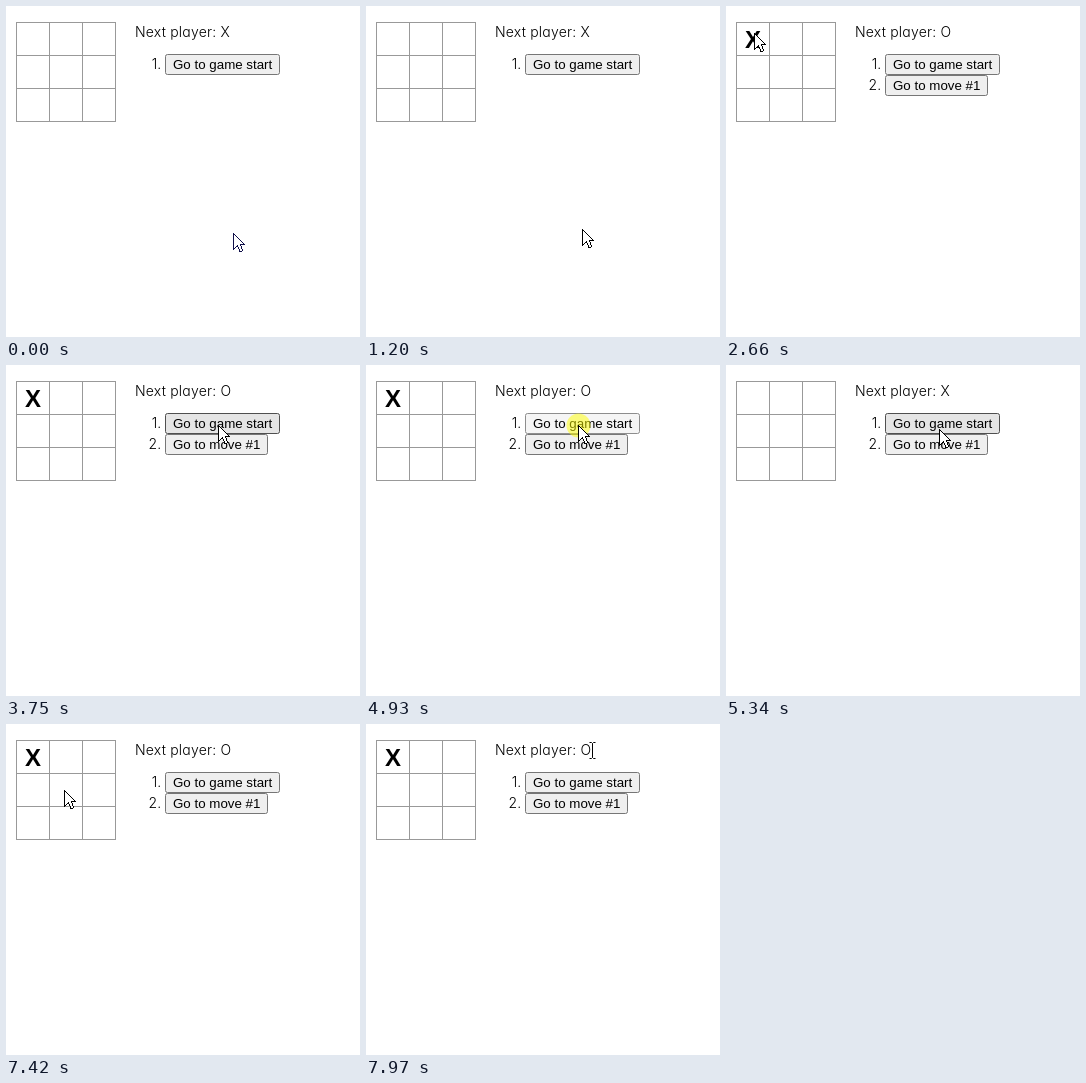
Recreate the animation shown at these times as an HTML page. Size 354 by 331 pixels, loop 8 s.

```html
<!DOCTYPE html>
<html lang="en">
<head>
<meta charset="utf-8">
<title>Tic-tac-toe</title>
<style>
  html, body { margin: 0; width: 100%; height: 100%; overflow: hidden; background: #fff; }
  svg { display: block; width: 354px; height: 331px; }
  text { white-space: pre; }
  .label { font: 300 14px Inter, "Open Sans", sans-serif; font-feature-settings: "cv11"; letter-spacing: .2px; }
  .end { text-anchor: end; }
  .button { font: 13.333px "Liberation Sans", Arial, sans-serif; }
  .mark { font: bold 24px "Liberation Sans", Arial, sans-serif; text-anchor: middle; }
  .crisp { shape-rendering: crispEdges; }
</style>
</head>
<body>
<svg viewBox="0 0 354 331">
  <g id="grid" class="crisp" fill="#999"></g>
  <text id="mark" class="mark" x="27" y="42">X</text>
  <text id="status" class="label" x="129" y="31"></text>
  <g id="moves"></g>
  <circle id="glow" r="12" fill="#ff0" fill-opacity=".5"/>
  <path id="arrow" class="crisp" d="M.5 .5V16.5L4.5 12.5L7 18.5H8.5L9.5 17L7.5 11.5H11.5Z" fill="#fff" stroke="#000"/>
  <path id="beam" d="M-3 -7.5H-1L0 -6.5L1 -7.5H3M0 -6.5V7.5M-3 8.5H-1L0 7.5L1 8.5H3" fill="none" stroke="#000"/>
</svg>
<script>
const LOOP = 8000;
const CELL = 33;
const $ = id => document.getElementById(id);
const show = (el, on) => el.setAttribute("visibility", on ? "visible" : "hidden");
const smooth = u => u * u * (3 - 2 * u);
const mix = (a, b, u) => a + (b - a) * u;

function add(parent, tag, attrs, text = "") {
  const el = document.createElementNS("http://www.w3.org/2000/svg", tag);
  for (const key in attrs) el.setAttribute(key, attrs[key]);
  el.textContent = text;
  parent.append(el);
  return el;
}

for (let i = 0; i < 4; i++) {
  add($("grid"), "rect", { x: 10 + i * CELL, y: 16, width: 1, height: 100 });
  add($("grid"), "rect", { x: 10, y: 16 + i * CELL, width: 100, height: 1 });
}

const buttons = ["Go to game start", "Go to move #1"].map((text, i) => {
  const top = 48 + i * 21;
  const group = add($("moves"), "g", {});
  add(group, "text", { class: "label end", x: 155.5, y: top + 15 }, `${i + 1}.`);
  const box = add(group, "rect", { x: 159.5, y: top + 0.5, height: 20, rx: 2 });
  const label = add(group, "text", { class: "button", x: 167, y: top + 15 }, text);
  const width = Math.floor(label.getComputedTextLength() + 16);
  box.setAttribute("width", width - 1);
  return { group, box, top, right: 159 + width };
});

// Each glide starts where the previous one stopped and advances in equal time steps.
const startAt = { x: 227, y: 227 };
const glides = [
  { from: 70, to: 70, steps: 1, x: 227, y: 226 },
  { from: 580, to: 730, steps: 3, x: 223, y: 225 },
  { from: 1200, to: 1200, steps: 1, x: 216, y: 223 },
  { from: 1277, to: 1660, steps: 6, x: 30, y: 22 },
  { from: 1810, to: 1960, steps: 3, x: 28, y: 27 },
  { from: 3140, to: 3750, steps: 9, x: 212, y: 60 },
  { from: 5340, to: 5340, steps: 1, x: 213, y: 64 },
  { from: 5415, to: 5790, steps: 6, x: 22, y: 31, bend: 32 },
  { from: 6968, to: 7500, steps: 8, x: 65, y: 73 },
  { from: 7670, to: 7970, steps: 5, x: 227, y: 26, bend: 12 },
];
const clicks = [2510, 4930, 6740];

function pointer(t) {
  let p = startAt;
  for (const g of glides) {
    if (t < g.from) break;
    const gap = (g.to - g.from) / (g.steps - 1) || 1;
    const step = Math.min(g.steps, 1 + Math.floor((t - g.from) / gap + 1e-6));
    const u = smooth(step / g.steps);
    const sag = 4 * u * (1 - u) * (g.bend || 0);
    p = { x: Math.round(mix(p.x, g.x, u)), y: Math.round(mix(p.y, g.y, u) + sag) };
  }
  return p;
}

function paintButton({ box, top, right }, x, y, pressed) {
  const hover = x >= 159 && x < right && y >= top && y < top + 21;
  const [fill, stroke] = !hover ? ["#efefef", "#767676"]
    : pressed ? ["#f5f5f5", "#8d8d8d"] : ["#e5e5e5", "#4f4f4f"];
  box.setAttribute("fill", fill);
  box.setAttribute("stroke", stroke);
}

function draw(t) {
  const { x, y } = pointer(t);
  const pressed = clicks.some(c => t >= c && t < c + 150);
  // Every click flips the board between empty and played.
  const flips = clicks.filter(c => t >= c + 76).length;
  const played = flips % 2 === 1;
  const overText = t >= 7970;

  show($("mark"), played);
  $("status").textContent = "Next player: " + (played ? "O" : "X");
  show(buttons[1].group, flips > 0);
  for (const b of buttons) paintButton(b, x, y, pressed);

  show($("glow"), pressed);
  $("glow").setAttribute("cx", x + 0.5);
  $("glow").setAttribute("cy", y + 0.5);

  show($("arrow"), !overText);
  show($("beam"), overText);
  $("arrow").setAttribute("stroke", t < 70 ? "#10104a" : "#000");
  $("arrow").setAttribute("transform", `translate(${x} ${y})`);
  $("beam").setAttribute("transform", `translate(${x - 0.5} ${y})`);
}

const began = performance.now();
function tick() {
  draw((performance.now() - began) % LOOP);
  requestAnimationFrame(tick);
}
draw(0);
requestAnimationFrame(tick);
</script>
</body>
</html>
```
